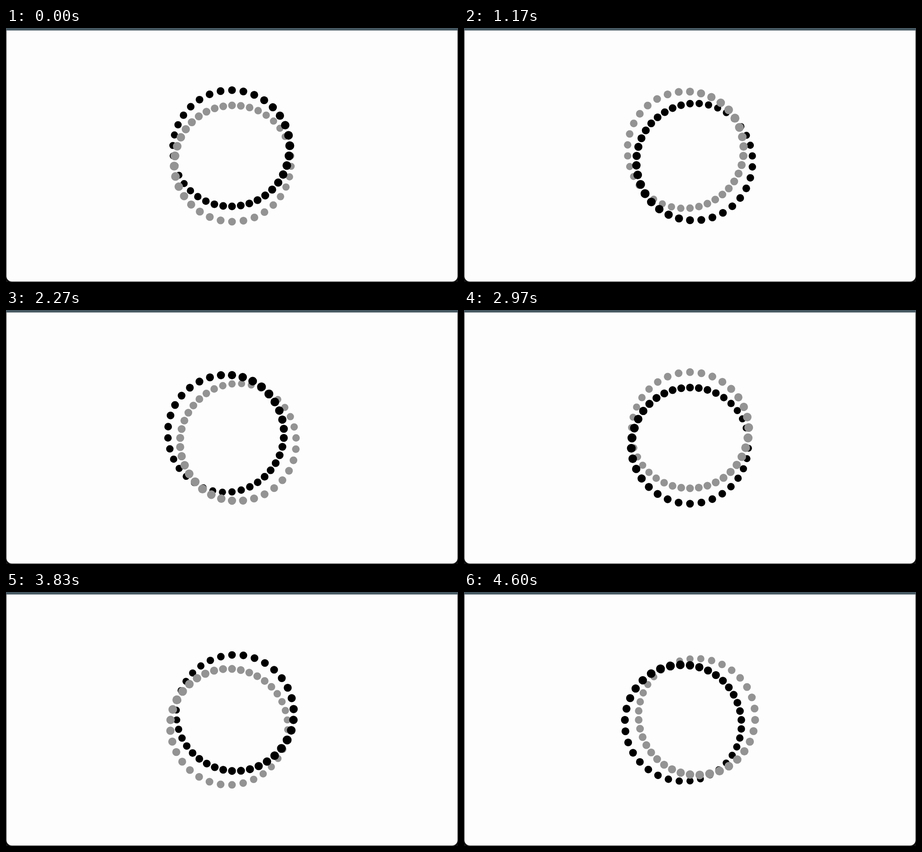
Recreate the animation shown at these times as an HTML page with a canvas. Size 998 px wide and 561 px high, loop 4730 ms.

```html
<!DOCTYPE html>
<html lang="en">
<head>
<meta charset="utf-8">
<title>Twisting dot ring</title>
<style>
  html, body { margin: 0; width: 100%; height: 100%; overflow: hidden; background: #111; }
  canvas { display: block; }
</style>
</head>
<body>
<canvas id="stage" width="998" height="561"></canvas>
<script>
const ctx = document.getElementById('stage').getContext('2d');
const LOOP = 4730, LAST = 4600, STEP = 100 / 3, PERIOD = 2000;
const DOTS = 36, CX = 499, CY = 282.5, RADIUS = 128.3, SIZE = 17.07;
const DEPTH = 1 / 7; // dot travel in z relative to the perspective distance
const OFFSET = 0.65; // starting phase, in dots

// cubic-bezier(.42, 0, 1, 1)
function easeIn(x) {
  let lo = 0, hi = 1;
  for (let i = 0; i < 20; i++) {
    const s = (lo + hi) / 2;
    if (1.26 * s * (1 - s) ** 2 + 3 * s * s - 2 * s ** 3 < x) lo = s; else hi = s;
  }
  return 3 * lo * lo - 2 * lo ** 3;
}

// Each dot cycles outside -> front -> inside -> back
function pose(phase) {
  const q = (phase % 1) * 4, quarter = Math.floor(q), f = q - quarter;
  const e = easeIn(quarter % 2 ? 1 - f : f);
  return {
    y: (quarter === 0 || quarter === 3 ? 1 : -1) * (1 - e),
    z: quarter < 2 ? e : -e
  };
}

function drawDot(angle, { y, z, color }) {
  const scale = 1 / (1 - z * DEPTH);
  const r = RADIUS + y * SIZE * scale;
  ctx.fillStyle = color;
  ctx.beginPath();
  ctx.arc(CX + r * Math.sin(angle), CY - r * Math.cos(angle), SIZE / 2 * scale, 0, Math.PI * 2);
  ctx.fill();
}

function drawBackground() {
  ctx.fillStyle = '#111';
  ctx.fillRect(0, 0, 998, 561);
  ctx.fillStyle = '#fdfdfd';
  ctx.beginPath();
  ctx.roundRect(1, 0, 996, 560, [0, 0, 12, 12]);
  ctx.fill();
  ctx.fillStyle = '#465862';
  ctx.fillRect(0, 0, 998, 5.5);
}

function draw(ms) {
  const tick = Math.floor((Math.floor(ms / 10) * 10 + 4) / STEP);
  const time = Math.min(tick * STEP, LAST);
  drawBackground();
  for (let i = 0; i < DOTS; i++) {
    const phase = time / PERIOD + (i + OFFSET) / DOTS;
    const pair = [
      { ...pose(phase), color: '#000' },
      { ...pose(phase + 0.5), color: '#939393' }
    ].sort((a, b) => a.z - b.z);
    pair.forEach(dot => drawDot(i / DOTS * Math.PI * 2, dot));
  }
}

const start = performance.now();
function frame() {
  draw((performance.now() - start) % LOOP);
  requestAnimationFrame(frame);
}
frame();
</script>
</body>
</html>
```
